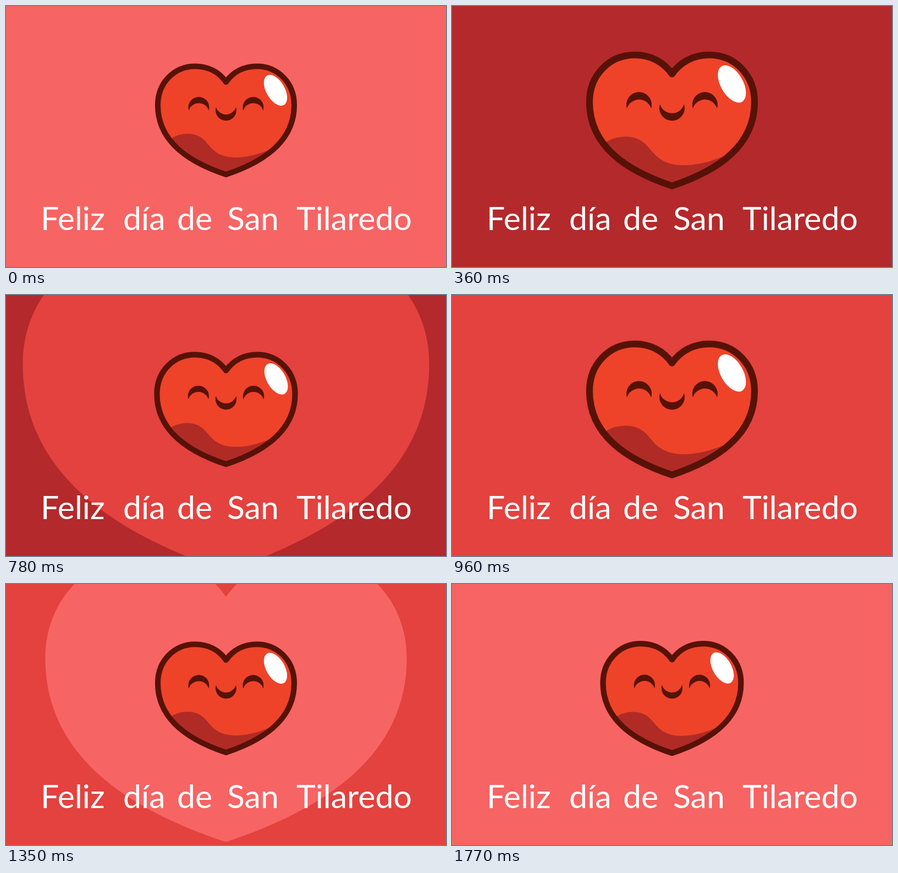
An HTML page with a canvas that plays this animation: 800 px wide and 474 px high, repeating every 1.8 s.

```html
<!DOCTYPE html>
<html lang="es">
<head>
<meta charset="utf-8">
<title>Feliz día</title>
<style>
  html, body { margin: 0; width: 100%; height: 100%; overflow: hidden; background: #f76464; }
  canvas { display: block; }
</style>
</head>
<body>
<canvas id="stage" width="800" height="474"></canvas>
<script>
const ctx = document.getElementById('stage').getContext('2d');
const W = 800, H = 474, CX = 400, CY = 207.5;
const BEAT = 600, STEP = 30, LOOP = 1800;
const COLORS = ['#f76464', '#b4292b', '#e3423f'];
const RED = '#ee4329', SHADE = '#b02b26', DARK = '#571208';
const WORDS = [['Feliz', 63], ['día', 213], ['de', 311], ['San', 402], ['Tilaredo', 528]];

// Heart outline around its own centre
const heart = new Path2D(
  'M0,-69.5 C-13,-88 -33,-98 -56,-98 C-94,-98 -124,-68 -124,-27.5 ' +
  'C-124,38.5 -69,75.5 0,98.5 C69,75.5 124,38.5 124,-27.5 ' +
  'C124,-68 94,-98 56,-98 C33,-98 13,-88 0,-69.5 Z');

const shade = new Path2D(
  'M-130,50 L-98,32 C-85,24 -60,20 -43,33 C-28,45 -23,66 15,67.5 ' +
  'C45,68 70,57 85,51 L130,40 L130,120 L-130,120 Z');

function scaled(s, draw) {
  ctx.save();
  ctx.translate(CX, CY);
  ctx.scale(s, s);
  draw();
  ctx.restore();
}

function crescent(x, y, flip) {
  const r = 19, gap = 11.2, a = Math.asin(gap / 2 / r);
  ctx.save();
  ctx.translate(x, y);
  ctx.scale(1, flip);
  ctx.beginPath();
  ctx.arc(0, 0, r, Math.PI - a, a);
  ctx.arc(0, gap, r, -a, Math.PI + a, true);
  ctx.fillStyle = DARK;
  ctx.fill();
  ctx.restore();
}

function drawHeart() {
  ctx.fillStyle = RED;
  ctx.fill(heart);

  ctx.save();
  ctx.clip(heart);
  ctx.fillStyle = SHADE;
  ctx.fill(shade);
  ctx.restore();

  ctx.strokeStyle = DARK;
  ctx.lineWidth = 10.1;
  ctx.lineJoin = 'round';
  ctx.stroke(heart);

  ctx.fillStyle = '#fff';
  ctx.beginPath();
  ctx.ellipse(90, -54.5, 16.8, 30.8, -0.52, 0, Math.PI * 2);
  ctx.fill();

  crescent(-49.5, -23.3, 1);
  crescent(49.5, -23.3, 1);
  crescent(0, -18.3, -1);
}

const clamp = v => Math.min(1, Math.max(0, v));
const inOut = u => u < 0.5 ? 2 * u * u : 1 - 2 * (1 - u) * (1 - u);

// Rest, quick swell, hold, release
function pulse(t) {
  const up = clamp((t - 150) / 240);
  const rise = 1 - Math.pow(1 - Math.pow(up, 2.5), 11);
  const fall = inOut(clamp((t - 420) / 180));
  return 1 + 0.21 * (rise - fall);
}

function drawText() {
  ctx.font = '59px Lato, "Open Sans", sans-serif';
  ctx.textBaseline = 'alphabetic';
  ctx.fillStyle = '#fff';
  for (const [word, x] of WORDS) ctx.fillText(word, x, 407);
}

function render(now) {
  const time = Math.floor((now % LOOP) / STEP) * STEP;
  const beat = Math.floor(time / BEAT);
  const t = time % BEAT;

  ctx.fillStyle = COLORS[beat];
  ctx.fillRect(0, 0, W, H);
  scaled(1 + 0.011 * t, () => {
    ctx.fillStyle = COLORS[(beat + 1) % COLORS.length];
    ctx.fill(heart);
  });
  scaled(pulse(t), drawHeart);
  drawText();
  requestAnimationFrame(render);
}
requestAnimationFrame(render);
</script>
</body>
</html>
```
